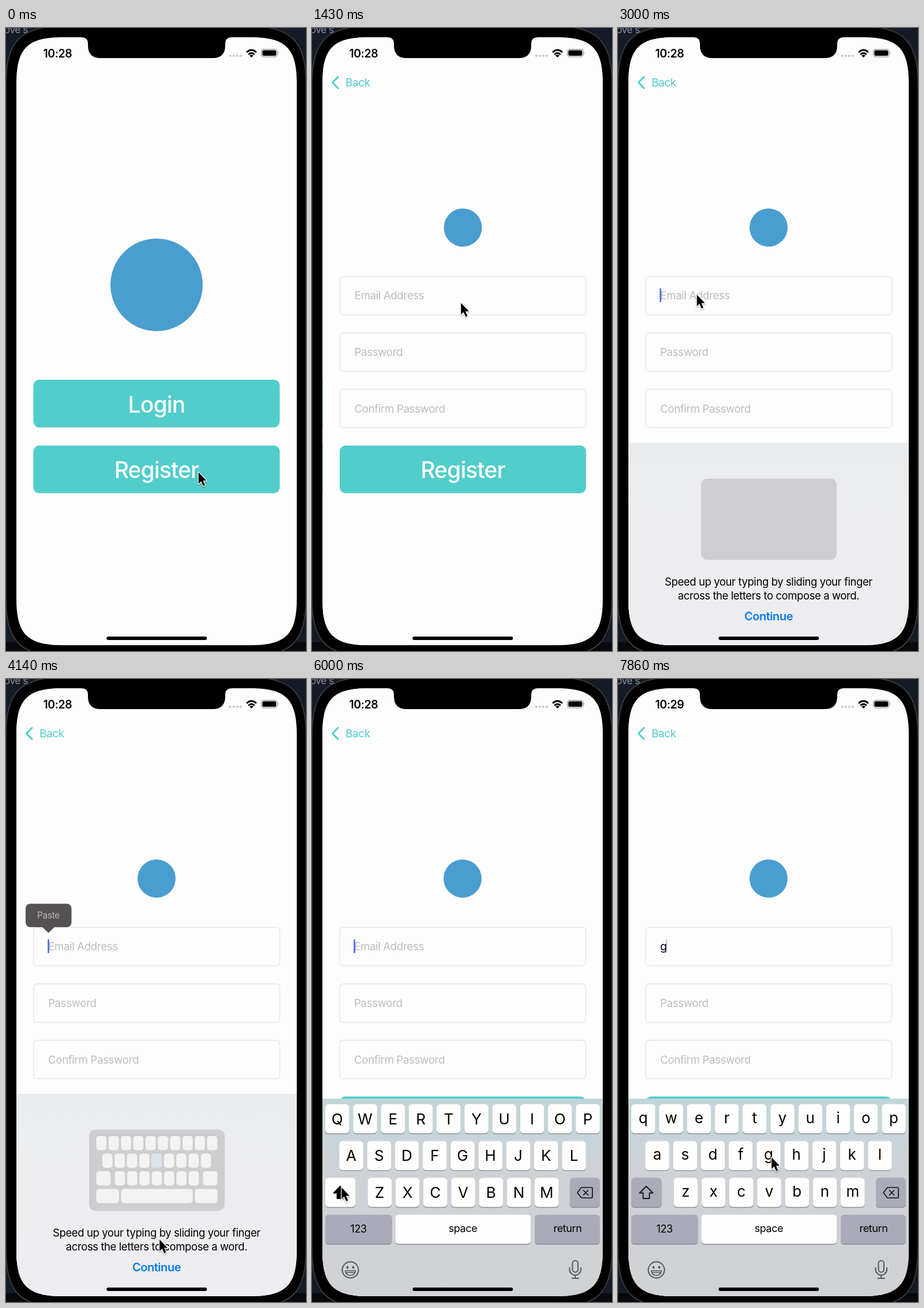
Animation, 520 px wide and 1077 px high, one loop 8000 ms. Source, as an HTML page:

```html
<!DOCTYPE html>
<html lang="en">
<head>
<meta charset="utf-8">
<title>Sign-up flow</title>
<style>
html, body { margin: 0; width: 100%; height: 100%; overflow: hidden; background: #10161f; }
svg { display: block; width: 520px; height: 1077px; }
text { font-family: Inter, Roboto, sans-serif; letter-spacing: -.022em; }
.mid { text-anchor: middle; }
.btn { font-size: 39px; font-weight: 500; fill: #fff; }
.hint { font-size: 18.8px; fill: #bdbcc0; }
.key { font-size: 26px; letter-spacing: 0; }
.word { font-size: 18px; }
.icon { fill: none; stroke: #54565a; stroke-width: 2; stroke-linecap: round; stroke-linejoin: round; }
</style>
</head>
<body>
<svg id="stage" viewBox="0 0 520 1077" xmlns="http://www.w3.org/2000/svg"></svg>
<script>
const LOOP = 8000, STEP = LOOP / 56, WIDTH = 486;
const TEAL = '#51cdcb', PAGE = '#fefdfe', MARK = '#4a9dcf';

const rect = (x, y, w, h, r, fill, extra = '') =>
  `<rect x="${x}" y="${y}" width="${w}" height="${h}" rx="${r}" fill="${fill}" ${extra}/>`;
const text = (x, y, cls, str, extra = '') =>
  `<text x="${x}" y="${y}" class="${cls}" ${extra}>${str}</text>`;
const group = (id, body, extra = '') => `<g id="${id}" ${extra}>${body}</g>`;
const path = (d, extra = '') => `<path d="${d}" ${extra}/>`;
const times = (n, fn) => Array.from({ length: n }, (_, i) => fn(i)).join('');

// Rounded box with smooth corners: e is the corner length, k the pull of its handles
function smoothBox(x, y, w, h, e, k) {
  const r = x + w, b = y + h;
  return `M${x + e} ${y}H${r - e}C${r - k} ${y} ${r} ${y + k} ${r} ${y + e}` +
    `V${b - e}C${r} ${b - k} ${r - k} ${b} ${r - e} ${b}` +
    `H${x + e}C${x + k} ${b} ${x} ${b - k} ${x} ${b - e}` +
    `V${y + e}C${x} ${y + k} ${x + k} ${y} ${x + e} ${y}Z`;
}

const button = (y, label) =>
  rect(47.5, y, 427, 82.5, 10, TEAL) + text(261, y + 56.5, 'btn mid', label);
const field = (y, label, id) =>
  rect(47.8, y, 426.8, 66.5, 6, PAGE, 'stroke="#e6e4ea" stroke-width="1.3"') +
  text(73, y + 40, 'hint', label, `id="${id}"`);

function welcome() {
  return rect(18, 16, WIDTH, 1051, 0, PAGE) +
    `<circle cx="261" cy="444" r="80" fill="${MARK}"/>` +
    button(608, 'Login') + group('press', button(721.8, 'Register'));
}

function signup() {
  return rect(18, 16, WIDTH, 1051, 0, PAGE) +
    `<circle cx="261" cy="345" r="33" fill="${MARK}"/>` +
    field(429.3, 'Email Address', 'email') +
    field(527, 'Password', 'pass') +
    field(624.5, 'Confirm Password', 'confirm') +
    button(721.8, 'Register') +
    text(73, 469.3, '', 'g', 'id="typed" font-size="19.5"') +
    rect(72.3, 450, 2.5, 24, 1, '#4169dd', 'id="caret"');
}

function paste() {
  return rect(34, 388.5, 79.5, 40.5, 8, '#565254') +
    path('M63 429H84L73.5 439Z', 'fill="#565254"') +
    text(73.5, 413.6, 'mid', 'Paste', 'font-size="15.4" fill="#b8b5b7"');
}

// Small keyboard picture inside the tip sheet
function miniKeys() {
  const key = (x, y, w, fill = '#f8f8f9') => rect(x, y, w, 24.5, 5, fill);
  const row = (n, x, y) => times(n, i => key(x + i * 21.35, y, 17.6));
  return row(10, 156.5, 790) + row(9, 167, 820.5) + row(7, 188.6, 851) +
    key(252.4, 820.5, 17.6, '#dfe7ec') +
    key(156.5, 851, 25) + key(341.5, 851, 25) +
    key(156.5, 881.5, 39.5) + key(199.5, 881.5, 124) + key(327.5, 881.5, 39);
}

function sheet() {
  return rect(18, 717, WIDTH, 350, 0, 'url(#sheetFill)') +
    rect(144, 779, 235, 140.5, 11, '#cecdd0') +
    group('mini', miniKeys()) +
    text(261, 964, 'mid', 'Speed up your typing by sliding your finger', 'font-size="18.5"') +
    text(261, 988, 'mid', 'across the letters to compose a word.', 'font-size="18.5"') +
    text(261, 1023.5, 'mid', 'Continue', 'font-size="20" font-weight="600" fill="#0b79ee"');
}

function keyCap(x, y, w, fill = '#fefefe', id = '') {
  return rect(x, y + 1.4, w, 50.5, 6, '#8b8d92') +
    rect(x, y, w, 50.5, 6, fill, id && `id="${id}"`);
}

function keyboard() {
  const rows = [['QWERTYUIOP', 23, 735], ['ASDFGHJKL', 47.2, 798.7], ['ZXCVBNM', 96.5, 862.3]];
  const letters = rows.map(([chars, x, y]) => times(chars.length, i =>
    keyCap(x + i * 48.25, y, 41.6) +
    text(x + i * 48.25 + 20.8, y + 34.5, 'key mid', chars[i]))).join('');
  const dark = '#a9acb8';
  return rect(18, 725.5, WIDTH, 342, 0, 'url(#boardFill)') + letters +
    keyCap(23, 862.3, 52.5, dark, 'shift') +
    path('M49 877L60.5 888.5H54.5V898H43.5V888.5H37.5Z',
      'id="arrow" stroke="#111" stroke-width="1.8" stroke-linejoin="round"') +
    keyCap(447, 862.3, 52, dark) +
    path('M467 879H484Q486 879 486 881V895Q486 897 484 897H467L460 888ZM470.5 884L478.5 892M478.5 884L470.5 892',
      'class="icon" style="stroke:#111;stroke-width:1.7"') +
    keyCap(23, 926, 115.5, dark) + text(80.7, 957, 'word mid', '123') +
    keyCap(144.3, 926, 235) + text(261.5, 955.5, 'word mid', 'space') +
    keyCap(386, 926, 113, dark) + text(443, 955.5, 'word mid', 'return') +
    '<circle cx="66.5" cy="1021.5" r="14" class="icon"/>' +
    '<ellipse cx="61.5" cy="1017" rx="1.8" ry="2.5" fill="#54565a"/>' +
    '<ellipse cx="71.5" cy="1017" rx="1.8" ry="2.5" fill="#54565a"/>' +
    path('M57.5 1023H75.5Q74 1031 66.5 1031T57.5 1023ZM59 1026H74', 'class="icon" style="stroke-width:1.5"') +
    rect(451.5, 1005.5, 9.5, 20, 4.7, 'none', 'class="icon"') +
    path('M446.5 1018V1021A9.7 9.5 0 0 0 466 1021V1018M456.2 1030.5V1036M450.5 1036H462', 'class="icon"');
}

function status() {
  const arc = (r, y) => path(`M${425.5 - r} ${y}Q425.5 ${y - r * .95} ${425.5 + r} ${y}`,
    'fill="none" stroke="#000" stroke-width="2.8"');
  return text(89.3, 50.5, 'mid', '10:28', 'id="clock" font-size="19.5" font-weight="600"') +
    times(4, i => `<circle cx="${388.7 + i * 6}" cy="48" r="2.1" fill="#c9c7ca"/>`) +
    arc(8.5, 42) + arc(5.3, 45.8) + path('M422 47.5Q425.5 44.8 429 47.5L425.5 51Z') +
    rect(442.5, 36.8, 27.5, 13, 4, 'none', 'stroke="#929193" stroke-width="1.2"') +
    rect(444.3, 38.6, 24, 9.4, 2.5, '#000') +
    path('M471.3 41Q473.3 43.2 471.3 45.5Z', 'fill="#929193"');
}

const stage = document.getElementById('stage');
stage.innerHTML = `
<defs>
  <clipPath id="screen">${path(smoothBox(18, 16, WIDTH, 1051, 80, 19))}</clipPath>
  <linearGradient id="sheetFill" x2="0" y2="1">
    <stop stop-color="#e8ebed"/><stop offset=".3" stop-color="#ecedef"/><stop offset="1" stop-color="#eeedf1"/>
  </linearGradient>
  <linearGradient id="boardFill" x2="0" y2="1">
    <stop stop-color="#c2d6da"/><stop offset=".16" stop-color="#c4d5da"/>
    <stop offset=".34" stop-color="#ced1d6"/><stop offset="1" stop-color="#d0d2d6"/>
  </linearGradient>
  <filter id="soft" x="-50%" y="-50%" width="200%" height="200%">
    <feDropShadow dx="0" dy="1.5" stdDeviation="1.3" flood-opacity=".35"/>
  </filter>
</defs>` +
  rect(0, 0, 520, 1077, 0, '#141b27') + rect(0, 1062, 520, 15, 0, '#07090c') +
  text(-3, 9, '', 'ove s', 'font-size="17" fill="#8a8f98"') +
  path(smoothBox(0, -3, 520, 1089, 98, 26), 'stroke="#3b3c40" stroke-width="1.8"') +
  group('', group('first', welcome()) + rect(18, 16, WIDTH, 1051, 0, '#000', 'id="dim"') +
    group('second', signup()) +
    group('header', path('M45 84.5L35.5 94.2L45 104', `fill="none" stroke="${TEAL}" stroke-width="3" stroke-linecap="round" stroke-linejoin="round"`) +
      text(58, 101, '', 'Back', `id="back" font-size="19" fill="${TEAL}"`)) +
    group('menu', paste()) + group('tip', sheet()) + group('board', keyboard()) +
    status() + rect(174.3, 1052, 174, 6, 3, '#000'), 'clip-path="url(#screen)"') +
  path('M130 14H392V16Q380 16 380 27V30Q380 52 358 52H164Q142 52 142 30V27Q142 16 130 16Z') +
  group('pointer', path('M1.2 2V22L5.7 17.8L9.2 25.8L12.5 24.4L9 16.5H15Z',
    'fill="#000" stroke="#fff" stroke-width="2.4" paint-order="stroke" stroke-linejoin="round"'), 'filter="url(#soft)"');

const el = id => document.getElementById(id);
const letters = [...document.querySelectorAll('.key')];
const show = (id, alpha) => el(id).setAttribute('opacity', alpha);
const move = (id, x, y = 0) => el(id).setAttribute('transform', `translate(${x} ${y})`);
const ramp = (t, a, b) => Math.min(1, Math.max(0, (t - a) / (b - a)));

// Pointer stops: time, x, y
const TRAIL = [
  [1000, 332.5, 766], [1143, 313, 728], [1286, 275, 590], [1429, 257, 473], [1571, 258, 398],
  [1714, 260, 380], [1857, 260, 380], [2000, 252, 370], [2429, 163, 430], [2714, 135.5, 459],
  [3429, 135.5, 459], [4143, 265, 967], [4429, 262, 1014], [4857, 262, 1014],
  [5571, 70, 890], [5857, 50, 877], [6429, 50, 877], [7000, 265, 825], [LOOP, 265, 825]
];

function pointerAt(t) {
  const i = TRAIL.findIndex(stop => stop[0] >= t);
  if (i < 1) return TRAIL[0].slice(1);
  const [a, b] = [TRAIL[i - 1], TRAIL[i]];
  const k = ramp(t, a[0], b[0]);
  return [a[1] + (b[1] - a[1]) * k, a[2] + (b[2] - a[2]) * k];
}

function caretAlpha(t) {
  if (t < 2990) return 0;
  if (t > 7100) return 1 - .65 * ramp(t, 7500, 7857);
  const p = (t % 1000) / 1000;
  return p < .5 ? 1 : Math.max(1 - ramp(p, .5, .65), ramp(p, .85, 1));
}

function draw(t) {
  // Critically damped push
  const s = Math.max(0, (t - 414) * .00905);
  const left = t > 1500 ? 0 : (1 + s) * Math.exp(-s);
  move('first', -.3 * WIDTH * (1 - left));
  move('second', WIDTH * left);
  show('dim', .09 * ramp(1 - left, 0, .7));
  show('header', 1 - left);
  move('back', 68 * left);
  show('press', t > 100 && t < 400 ? .6 + .4 * ramp(t, 143, 429) : 1);

  show('menu', t > 3700 && t < 4500 ? 1 : 0);
  show('tip', t > 2990 && t < 4800 ? 1 : 0);
  show('mini', .9 * ramp(t, 3286, 4000));
  show('board', ramp(t, 4429, 4714));

  const lower = t > 6100, typed = t > 7100;
  for (const n of letters) {
    const c = n.textContent;
    n.textContent = lower ? c.toLowerCase() : c.toUpperCase();
    n.setAttribute('dy', lower ? -2 : 0);
  }
  el('shift').setAttribute('fill', lower ? '#a9acb8' : '#fefefe');
  el('arrow').setAttribute('fill', lower ? 'none' : '#000');
  el('clock').textContent = t > 6950 ? '10:29' : '10:28';
  show('email', typed ? 0 : 1);
  show('typed', typed ? 1 : 0);
  show('caret', caretAlpha(t));
  move('caret', typed ? 10.5 : 0);
  move('pointer', ...pointerAt(t));
}

let start;
function tick(now) {
  start ??= now;
  const t = (now - start) % LOOP;
  draw(Math.floor((t + 5) / STEP) % 56 * STEP);
  requestAnimationFrame(tick);
}
draw(0);
requestAnimationFrame(tick);
</script>
</body>
</html>
```
